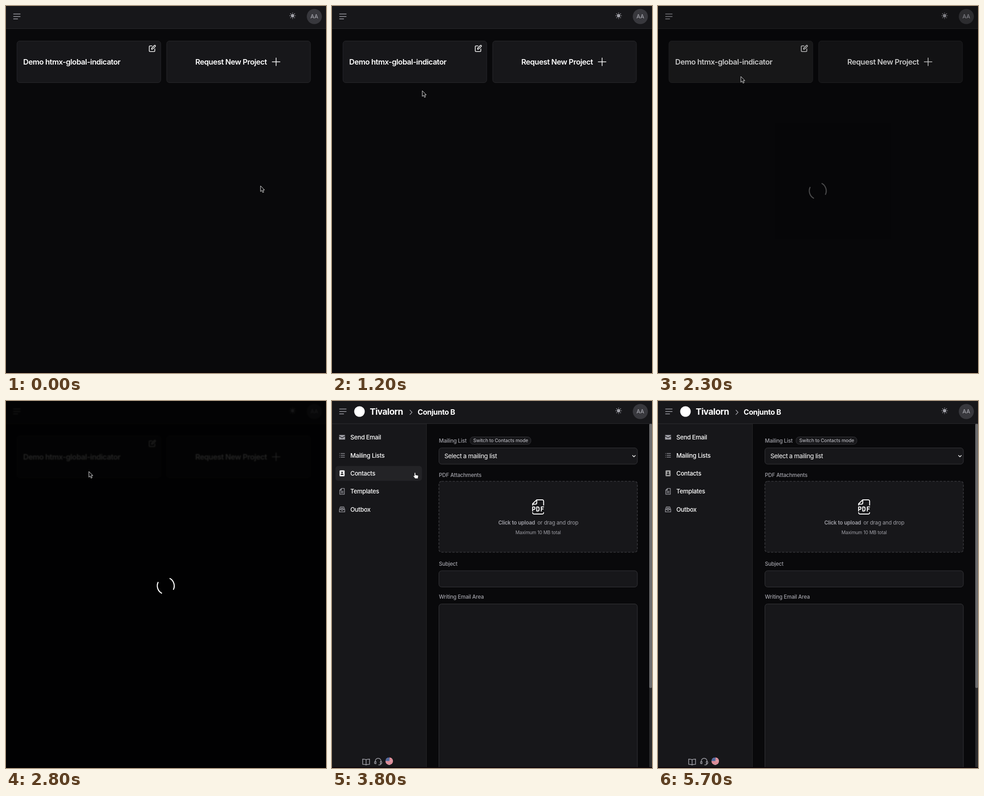
Recreate the animation shown at these times as an HTML page. Size 699 by 802 pixels, loop 5800 ms.

```html
<!DOCTYPE html>
<html lang="en">
<head>
<meta charset="utf-8">
<title>Loading indicator demo</title>
<style>
  html, body { margin: 0; width: 100%; height: 100%; overflow: hidden; background: #09090b; }
  svg { display: block; width: 699px; height: 802px; font-family: Inter, "Open Sans", sans-serif; }
  .panel { fill: #17171a; stroke: #29292c; }
  .field { fill: #17171a; stroke: #37373b; }
  .line { fill: none; stroke: #a1a1a8; stroke-width: 1.5; stroke-linecap: round; stroke-linejoin: round; }
  .white { stroke: #fff; }
  .card-title { font-size: 16.5px; font-weight: 600; letter-spacing: -.5px; fill: #fff; }
  .brand { font-size: 19px; font-weight: 700; letter-spacing: -.5px; fill: #fff; }
  .crumb { font-size: 16px; font-weight: 700; letter-spacing: -.4px; fill: #fff; }
  .label { font-size: 11.6px; font-weight: 500; letter-spacing: -.2px; fill: #a1a1a8; }
  .pill { font-size: 10.3px; font-weight: 500; letter-spacing: -.15px; fill: #b4b4ba; }
  .select { font-size: 13.6px; letter-spacing: -.4px; fill: #fff; }
  .hint { font-size: 11.6px; letter-spacing: -.15px; fill: #a1a1a8; }
  .strong { font-size: 11.5px; font-weight: 600; }
  .small { font-size: 10px; letter-spacing: -.1px; }
  .nav { font-size: 13.3px; font-weight: 500; letter-spacing: -.33px; fill: #fff; }
</style>
</head>
<body>
<svg viewBox="0 0 699 802">
  <defs>
    <clipPath id="round"><circle cx="125" cy="787" r="8.2"/></clipPath>
  </defs>
  <rect width="699" height="802" fill="#09090b"/>

  <g id="app">
    <g id="projects">
      <rect class="panel" x="24" y="76.5" width="314" height="91" rx="6"/>
      <rect id="cardHover" x="24" y="76.5" width="314" height="91" rx="6" fill="#232325" stroke="#29292c"/>
      <text class="card-title" x="37.5" y="127.5">Demo htmx-global-indicator</text>
      <path class="line white" d="M319 87.3h-4.6a1.5 1.5 0 0 0-1.5 1.5v9.2a1.5 1.5 0 0 0 1.5 1.5h9.2a1.5 1.5 0 0 0 1.5-1.5v-4.5M317.8 94.6l.6-2.7 5.8-5.8a1.5 1.5 0 0 1 2.1 2.1l-5.8 5.8z"/>
      <rect class="panel" x="351" y="76.5" width="314" height="91" rx="6"/>
      <text class="card-title" x="413.5" y="127.5">Request New Project</text>
      <path class="line white" d="M590 113.5v17M581.5 122h17"/>
    </g>

    <g id="mailer">
      <rect class="field stretch" y="102.5" height="35.5" rx="6"/>
      <rect class="field stretch" y="175.5" height="155" rx="6" stroke-width="1.6" stroke-dasharray="5 3"/>
      <rect class="field stretch" y="371" height="35.5" rx="6"/>
      <rect class="field stretch" y="443.5" height="380" rx="6"/>
      <path class="line white" stroke-width="1.8" d="M656.5 119l3 3 3-3"/>
      <g id="leftPart">
        <text class="label" y="91">Mailing List</text>
        <rect class="field" x="68" y="78.5" width="133" height="16" rx="7"/>
        <text class="pill" x="75" y="90">Switch to Contacts mode</text>
        <text class="select" x="12" y="125.3">Select a mailing list</text>
        <text class="label" y="166">PDF Attachments</text>
        <text class="label" y="359.5">Subject</text>
        <text class="label" y="432">Writing Email Area</text>
      </g>
      <g id="centrePart">
        <path class="line white" style="stroke-width:2" transform="translate(0 231.5)"
          d="M-12-4v-3l9-8.5h12a3 3 0 0 1 3 3v8.5M-12-6h6a3 3 0 0 0 3-3v-6M-12 12.500a3 3 0 0 0 3 3h18a3 3 0 0 0 3-3M-12 9v-9h2.500a2.700 2.700 0 0 1 0 5.400h-2.500M-3 0v9h2a3 3 0 0 0 3-3v-3a3 3 0 0 0-3-3zM12 0h-5v9M7 4.500h4"/>
        <text class="hint strong" x="-87" y="270">Click to upload</text>
        <text class="hint" x="-1.500" y="270">or drag and drop</text>
        <text class="hint small" y="290.500" text-anchor="middle">Maximum 10 MB total</text>
      </g>
      <rect x="693" y="50" width="6" height="752" fill="#2b2b2d"/>
      <rect x="693" y="50" width="6" height="577" rx="2" fill="#6b6b6d"/>
      <g id="sidebar">
        <rect x="-1" y="50" width="207.500" height="754" fill="#17171a" stroke="#242427"/>
        <rect id="navHover" x="7.500" y="142" width="189" height="32.500" rx="6" fill="#232326"/>
        <g id="navItems"></g>
        <path class="line" d="M74.500 784v11M74.500 784c-2-1.300-5-1.500-7.500-1.500v11.500c2.500 0 5.500 0 7.500 1.300 2-1.300 5-1.300 7.500-1.300v-11.500c-2.500 0-5.500.2-7.500 1.500z"/>
        <path class="line" d="M94.500 788v-1a6.300 6.300 0 0 1 12.600 0v1M94 788h2v4.500h-2a1 1 0 0 1-1-1v-2.500a1 1 0 0 1 1-1zM107.600 788h-2v4.500h2a1 1 0 0 0 1-1v-2.500a1 1 0 0 0-1-1zM107 792.500c0 2-1.500 2.800-5 2.800"/>
        <g clip-path="url(#round)">
          <rect x="116" y="778" width="18" height="18" fill="#eee"/>
          <path stroke="#c9334a" stroke-width="1.300" d="M116 780h18M116 782.600h18M116 785.200h18M116 787.800h18M116 790.400h18M116 793h18"/>
          <rect x="116" y="778" width="9.500" height="8.500" fill="#37548f"/>
          <path stroke="#dfe5f0" stroke-dasharray="1 1.500" d="M118 781.500h7M119 784h6"/>
        </g>
      </g>
    </g>

    <g id="header">
      <rect x="-1" y="-1" width="701" height="50.500" fill="#17171a" stroke="#29292c"/>
      <path class="line" d="M16.500 17.500h14.500M16.500 23h14.500M16.500 28.300h9"/>
      <g id="crumbs">
        <circle cx="60" cy="23" r="11.500" fill="#fff"/>
        <text class="brand" x="82.500" y="30">Tivalorn</text>
        <path class="line" d="M170.300 20l4.500 4.700-4.500 4.700"/>
        <text class="crumb" x="187" y="30">Conjunto B</text>
      </g>
      <circle cx="626" cy="21.300" r="3.700" fill="#a1a1a8"/>
      <circle cx="626" cy="21.300" r="6" fill="none" stroke="#a1a1a8" stroke-width="1.800" pathLength="16" stroke-dasharray=".6 1.400" stroke-dashoffset=".3"/>
      <circle cx="673.500" cy="23" r="16.500" fill="#38383d"/>
      <text x="673.500" y="27.300" text-anchor="middle" font-size="11.800" font-weight="500" fill="#a1a1a8">AA</text>
    </g>
  </g>
  <rect y="800" width="699" height="2" fill="#0a0308"/>

  <g id="overlay">
    <rect width="699" height="802" fill-opacity=".86"/>
    <circle id="spinner" cx="349" cy="404" r="18.500" fill="none" stroke="#fff" stroke-width="2.300" pathLength="4" stroke-dasharray="1 1"/>
  </g>

  <g id="cursor">
    <path id="arrow" fill="#0b0b0d" stroke="#e8e8e8" stroke-linejoin="round" d="M0 0v12.500l2.800-2.600 2.100 4.700 2.200-1-2-4.500h3.700z"/>
    <path id="hand" transform="translate(-4 2.500)" fill="#fff" stroke="#111" stroke-width=".6" d="M3 1.300a1.200 1.200 0 0 1 2.400 0v3.700l4.700 1c1.100.3 1.500 1 1.300 2l-.6 3v2h-6l-3.900-4.800c-.6-1 .5-1.800 1.500-1l.6.6z"/>
  </g>
</svg>
<script>
const LOOP = 5800, STEP = 100;
const $ = id => document.getElementById(id);
const set = (el, attrs) => { for (const k in attrs) el.setAttribute(k, attrs[k]); };
const show = (el, on) => { el.style.display = on ? '' : 'none'; };
const ramp = (t, a, b) => Math.min(1, Math.max(0, (t - a) / (b - a)));
const smooth = (t, a, b) => { const p = ramp(t, a, b); return p * p * (3 - 2 * p); };
const mix = (a, b, p) => a + (b - a) * p;

// Icons are drawn around their own centre.
const NAV = [
  ['Send Email', '<path fill="#a1a1a8" d="M-6.500-5h13v1.500l-6.500 4-6.500-4zM-6.500-2l6.500 4 6.500-4v7h-13z"/>'],
  ['Mailing Lists', '<path class="line" style="stroke-width:1.300" d="M-2.500-4h8M-2.500 0h8M-2.500 4h8M-5.500-4h.3M-5.500 0h.3M-5.500 4h.3"/>'],
  ['Contacts', '<g id="contactIcon"><rect x="-5.500" y="-6.500" width="11" height="13" rx="1.500"/><circle cy="-2" r="1.800" fill="#17171a"/><path fill="#17171a" d="M-3.300 3.500c0-4 6.600-4 6.600 0z"/></g>'],
  ['Templates', '<path class="line" style="stroke-width:1.300" d="M-1.500-6.300h6.500v12.600h-10v-9zM-1.500-6.300v3.600h-3.500M-2.500 0h5M-2.500 3h5"/>'],
  ['Outbox', '<path class="line" style="stroke-width:1.300" d="M-5.800 0v5.500h11.600v-5.500l-2-5.500h-7.600zM-5.800 0h3.300l1 2h3l1-2h3.300M-2.500-3h5M-3-1h6"/>']
];
$('navItems').innerHTML = NAV.map(([name, icon], i) => {
  const y = 79.3 + i * 39.4;
  return `<g transform="translate(22 ${y})">${icon}</g><text class="nav" x="40" y="${y + 4.8}">${name}</text>`;
}).join('');

const stretchy = document.querySelectorAll('.stretch');

function drawForm(open) {
  const left = mix(24, 233.5, open);
  stretchy.forEach(r => set(r, { x: left, width: 667 - left }));
  set($('leftPart'), { transform: `translate(${left} 0)` });
  set($('centrePart'), { transform: `translate(${(left + 667) / 2} 0)` });
  set($('sidebar'), { transform: `translate(${-208 * (1 - open)} 0)` });
  show($('sidebar'), open > 0);
}

function drawCursor(t) {
  const first = smooth(t, 0, 500), second = smooth(t, 800, 1400);
  const x = mix(mix(556, 243.5, first), 181, second);
  const y = mix(mix(393, 274, first), 154, second);
  const pointing = (t >= 1400 && t < 2300) || t >= 3200;
  set($('cursor'), { transform: `translate(${x} ${y})`, opacity: 1 - ramp(t, 4300, 4900) });
  show($('hand'), pointing);
  show($('arrow'), !pointing);
}

function draw(t) {
  const mailing = t >= 2900;
  show($('projects'), !mailing);
  show($('mailer'), mailing);
  show($('crumbs'), mailing);
  set($('cardHover'), { opacity: ramp(t, 1200, 1400) - ramp(t, 2200, 2400) });

  const veil = mailing ? 0 : smooth(t, 2200, 2500);
  show($('overlay'), veil > 0);
  set($('overlay'), { opacity: veil });
  $('app').style.filter = veil ? `blur(${1.2 * veil}px)` : 'none';
  set($('spinner'), { transform: `rotate(${(t - 2800) * .36 - 63} 349 404)` });

  drawForm(smooth(t, 2900, 3200));
  const hover = ramp(t, 3100, 3300) - ramp(t, 4300, 4500);
  const grey = mix(161, 255, hover);
  set($('navHover'), { opacity: hover });
  set($('contactIcon'), { fill: `rgb(${grey},${grey},${grey})` });
  drawCursor(t);
}

const start = performance.now();
function tick() {
  const t = (performance.now() - start) % LOOP;
  draw(Math.floor(t / STEP) * STEP);
  requestAnimationFrame(tick);
}
tick();
</script>
</body>
</html>
```
